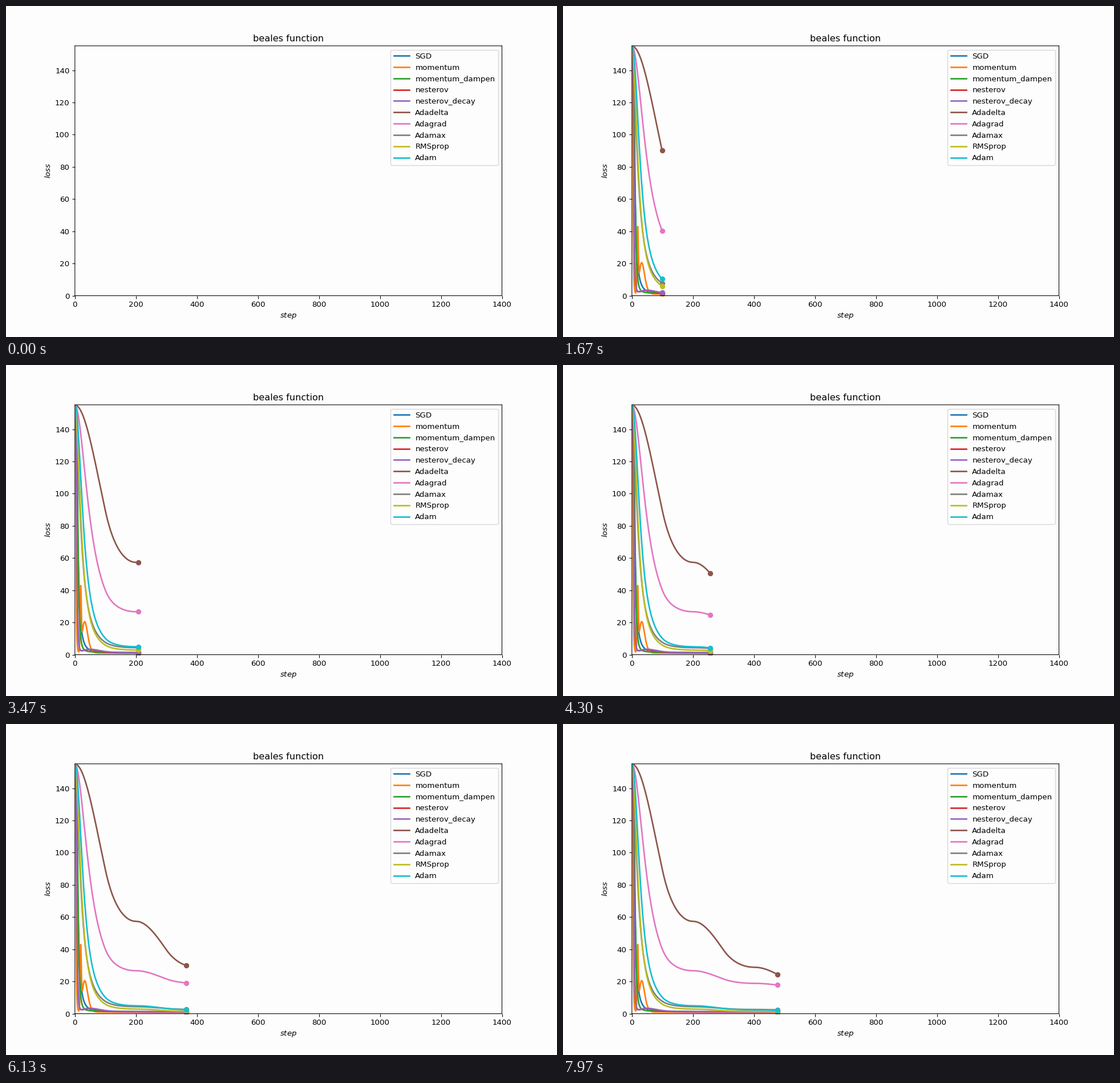
These frames come from a looping animation (966x580 px, 8000 ms). A matplotlib script:

```python
import numpy as np
import matplotlib.pyplot as plt
from matplotlib.animation import FuncAnimation

WIDTH, HEIGHT, DPI = 966, 580, 96
FRAMES = 240
STEPS_PER_FRAME = 2
HALF_CYCLE = 100
START = 155
PAPER = "#fdfdfd"

plt.rcParams.update({
    "font.family": "DejaVu Sans",
    "font.size": 10.07,
    "figure.facecolor": PAPER,
    "axes.facecolor": PAPER,
})


def travel(t):
    """Integral of a triangular learning rate that peaks at 1 mid-cycle."""
    cycle, phase = np.divmod(t, 2 * HALF_CYCLE)
    rising = phase ** 2 / (2 * HALF_CYCLE)
    falling = HALF_CYCLE - (2 * HALF_CYCLE - phase) ** 2 / (2 * HALF_CYCLE)
    return cycle * HALF_CYCLE + np.where(phase < HALF_CYCLE, rising, falling)


def decay(x, half, power=1, floor=0):
    return floor + (START - floor) / (1 + (x / half) ** power)


def hump(t, peak, sharpness):
    """Skewed bump of height 1 at the peak."""
    u = t / peak
    return (u * np.exp(1 - u)) ** sharpness


step = np.arange(FRAMES * STEPS_PER_FRAME)
way = travel(step)
nesterov_decay = (decay(step, 6.5, 5, 1.2) + 1.9 * hump(step, 50, 4)
                  + 0.4 * np.exp(-step / 150))

losses = {
    "SGD": decay(step, 9, 2.6, 1.1),
    "momentum": (decay(step, 4, 5, 1) + 37.5 * hump(step, 19, 110)
                 + 19.5 * hump(step, 32, 13)),
    "momentum_dampen": decay(step, 10, 4.3, 1.2) + 0.9 * np.exp(-step / 90),
    "nesterov": nesterov_decay - 0.3 * (1 - np.exp(-step / 40)),
    "nesterov_decay": nesterov_decay,
    "Adadelta": START / (1 + way / 180) ** 2.25,
    "Adagrad": decay(way, 13, floor=10),
    "Adamax": decay(way, 2, 0.95, 0.7),
    "RMSprop": decay(way, 2.3, 1.05),
    "Adam": decay(way, 4.25, 1.08),
}

fig, ax = plt.subplots(figsize=(WIDTH / DPI, HEIGHT / DPI), dpi=DPI)
fig.subplots_adjust(left=120.8 / WIDTH, right=869.5 / WIDTH,
                    bottom=1 - 507.6 / HEIGHT, top=1 - 69.8 / HEIGHT)
ax.set(xlim=(0, 1400), ylim=(0, 155.15), title="beales function",
       xlabel="$step$", ylabel="$loss$")
for spine in ax.spines.values():
    spine.set_snap(False)

lines, dots = [], []
for i, name in enumerate(losses):
    color = f"C{i}"
    lines += ax.plot([], [], color=color, lw=2, label=name)
    dots += ax.plot([], [], "o", color=color, ms=6)
ax.legend(loc="upper right", edgecolor="#ccccd6", labelspacing=0.508)


def draw(frame):
    n = frame * STEPS_PER_FRAME
    for line, dot, loss in zip(lines, dots, losses.values()):
        line.set_data(step[:n], loss[:n])
        dot.set_data(step[:n][-1:], loss[:n][-1:])
    return lines + dots


anim = FuncAnimation(fig, draw, frames=FRAMES, init_func=lambda: draw(0),
                     interval=8000 / FRAMES, repeat=True, repeat_delay=0)
plt.show()
```
